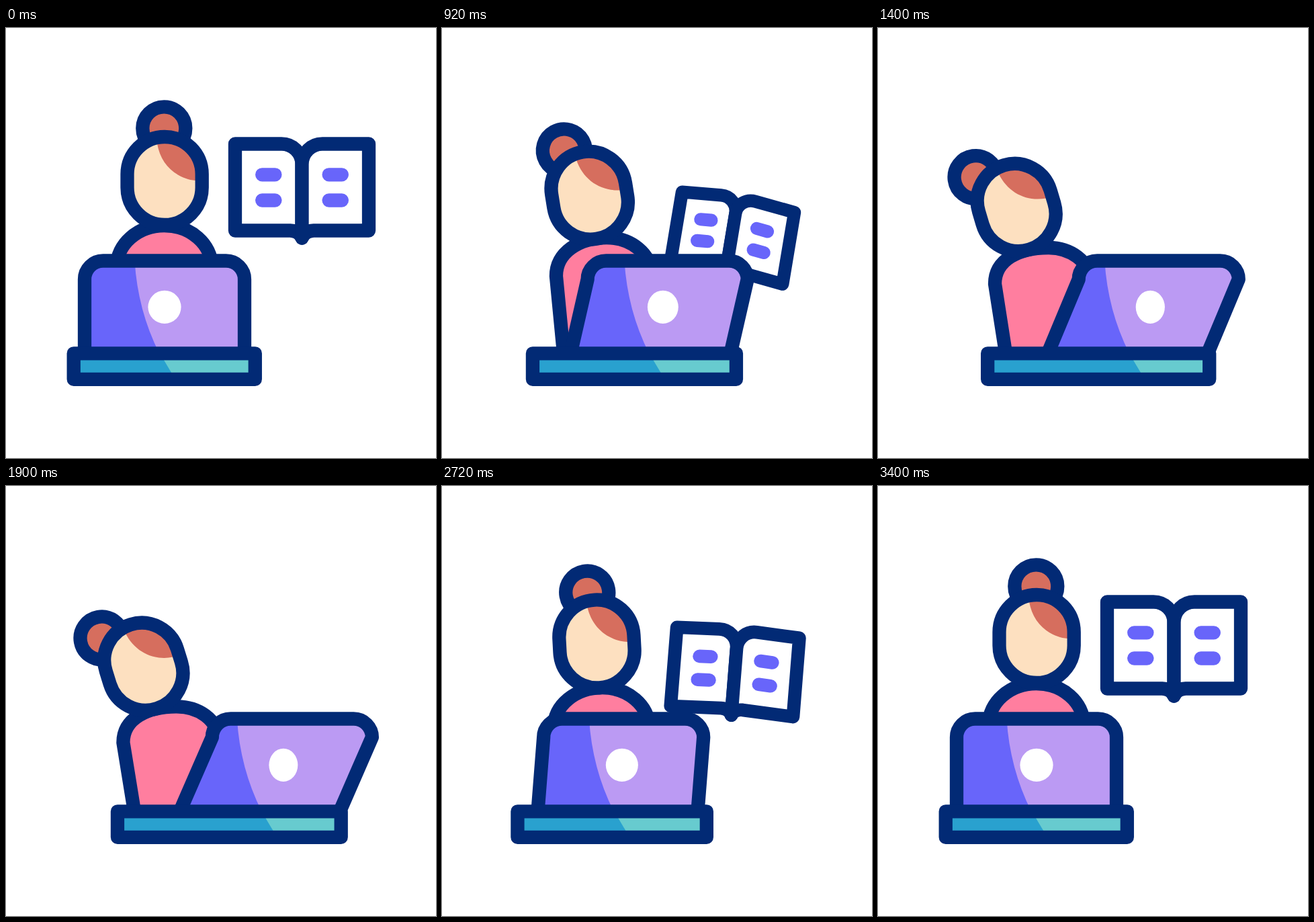
These frames come from a looping animation (640x640 px, 3600 ms). An HTML page:

```html
<!DOCTYPE html>
<html lang="en">
<head>
<meta charset="utf-8">
<title>Studying at a laptop</title>
<style>
@property --lean { syntax: "<number>"; inherits: true; initial-value: 0; }
@property --drop { syntax: "<number>"; inherits: true; initial-value: 0; }

html, body { margin: 0; width: 100%; height: 100%; overflow: hidden; background: #fff; }

svg {
  display: block; width: 640px; height: 640px;
  animation: lean 3.6s infinite, drop 3.6s infinite;
}

@keyframes lean {
  0% { --lean: 0; }
  5.417% { --lean: 0; animation-timing-function: cubic-bezier(.632, 0, .24, 1); }
  49.306% { --lean: 1; }
  51.389% { --lean: 1; animation-timing-function: cubic-bezier(.687, 0, .135, 1); }
  94.861%, 100% { --lean: 0; }
}
@keyframes drop {
  0% { --drop: 0; }
  7.361% { --drop: 0; animation-timing-function: cubic-bezier(.632, 0, .24, 1); }
  51.25% { --drop: 1; }
  52.917% { --drop: 1; animation-timing-function: cubic-bezier(.687, 0, .135, 1); }
  94.722%, 100% { --drop: 0; }
}
@keyframes morph {
  0% { d: var(--a); }
  5.417% { d: var(--a); animation-timing-function: cubic-bezier(.632, 0, .24, 1); }
  49.306% { d: var(--b); }
  51.389% { d: var(--b); animation-timing-function: cubic-bezier(.687, 0, .135, 1); }
  94.861%, 100% { d: var(--a); }
}

.morph { d: var(--a); animation: morph 3.6s infinite; }
.line { stroke: #022a75; stroke-width: 20.3px; stroke-linejoin: round; }
.hollow { fill: none; }

.page {
  --h: calc(1 - .42 * var(--drop));
  --v: calc(1 - .455 * var(--drop));
  --sx: calc(-.363 * var(--drop));
  --x: calc(-15.4 * var(--drop));
  --y: calc(186 * var(--drop));
  transform-origin: 440.5px 218.5px;
  transform: matrix(var(--h), calc(var(--tilt) * var(--drop)), var(--sx), var(--v), var(--x), var(--y));
}
.left { --tilt: .187; }
.right { --tilt: .62; }
.sheet, .text {
  stroke: #022a75;
  stroke-width: calc(20.3px - 3px * var(--drop));
  stroke-linejoin: round;
  stroke-linecap: round;
  vector-effect: non-scaling-stroke;
}
.sheet { fill: #fff; }
.text { stroke: #6865fa; }

.head, .bun { transform-origin: 236px 227.5px; }
.head {
  transform: translate(calc(-31.3px * var(--lean)), calc(41.3px * var(--lean)))
             rotate(calc(-17.3deg * var(--lean)));
}
.bun {
  transform: translate(calc(-31.3px * var(--lean)), calc(41.3px * var(--lean)))
             rotate(calc(-55.3deg * var(--lean)))
             translateY(calc(3px * var(--lean)));
}

.body {
  --a: path("M170 484 L165 355 C165 322 196 294 235.5 294 C275 294 306 322 306 355 L301 484");
  --b: path("M191 484 L174.4 382 C174.4 346 210.6 328.5 253.8 328.5 C285.5 328.5 315.4 346 318.5 382 L319 484");
}
.lid {
  --a: path("M117 484 L117 374 A27.5 27.5 0 0 1 144.5 346.5 L327.5 346.5 A27.5 27.5 0 0 1 355 374 L355 484");
  --b: path("M259 484 L307 374 A27.5 27.5 0 0 1 334.5 346.5 L517.5 346.5 A27.5 27.5 0 0 1 545 374 L497 484");
}
.shade {
  --a: path("M117 484 L117 374 A27.5 27.5 0 0 1 144.5 346.5 L191.5 346.5 Q196 420 228 484 Z");
  --b: path("M259 484 L307 374 A27.5 27.5 0 0 1 334.5 346.5 L344 346.5 Q348.5 420 380.5 484 Z");
}
.base {
  --a: path("M100.7 484.3 L370.8 484.3 L370.8 522.8 L100.7 522.8 Z");
  --b: path("M166 484.3 L498.8 484.3 L498.8 522.8 L166 522.8 Z");
}
.edge {
  --a: path("M100.7 484.3 L229 484.3 L252 522.8 L100.7 522.8 Z");
  --b: path("M166 484.3 L380.5 484.3 L403.5 522.8 L166 522.8 Z");
}
.dot {
  transform-origin: 236px 415.3px;
  transform: translateX(calc(177px * var(--lean))) scaleX(calc(1 - .127 * var(--lean)));
}
</style>
</head>
<body>
<svg viewBox="0 0 640 640">
  <defs>
    <g id="half">
      <path class="sheet" d="M440.5 312.5 V203 A30.5 30.5 0 0 0 410 172.5 H341 V301.5 H423 Q436 302 440.5 312.5"/>
      <path class="text" d="M381.2 218.3 H400.4 M381.2 256.5 H400.4"/>
    </g>
  </defs>

  <g class="page left"><use href="#half"/></g>
  <g class="page right"><use href="#half" transform="matrix(-1 0 0 1 881 0)"/></g>

  <path class="morph body line" fill="#ff7e9f"/>
  <circle class="bun line" cx="235.3" cy="149.3" r="32" fill="#d66e5e"/>
  <g class="head">
    <rect x="180.5" y="162" width="111.2" height="131" rx="55.6" fill="#fde0c0"/>
    <path fill="#d66e5e" d="M223 163 L225 172 C230 203 253 224 282 227 L291.7 227.5 V217.6 A55.6 55.6 0 0 0 236 162 Z"/>
    <rect class="line hollow" x="180.5" y="162" width="111.2" height="131" rx="55.6"/>
  </g>

  <path class="morph lid" fill="#bb9af3"/>
  <path class="morph shade" fill="#6865fa"/>
  <circle class="dot" cx="236" cy="415.3" r="24.6" fill="#fff"/>
  <path class="morph lid line hollow"/>

  <path class="morph base" fill="#67cbcf"/>
  <path class="morph edge" fill="#29a1cf"/>
  <path class="morph base line hollow"/>
</svg>
</body>
</html>
```
